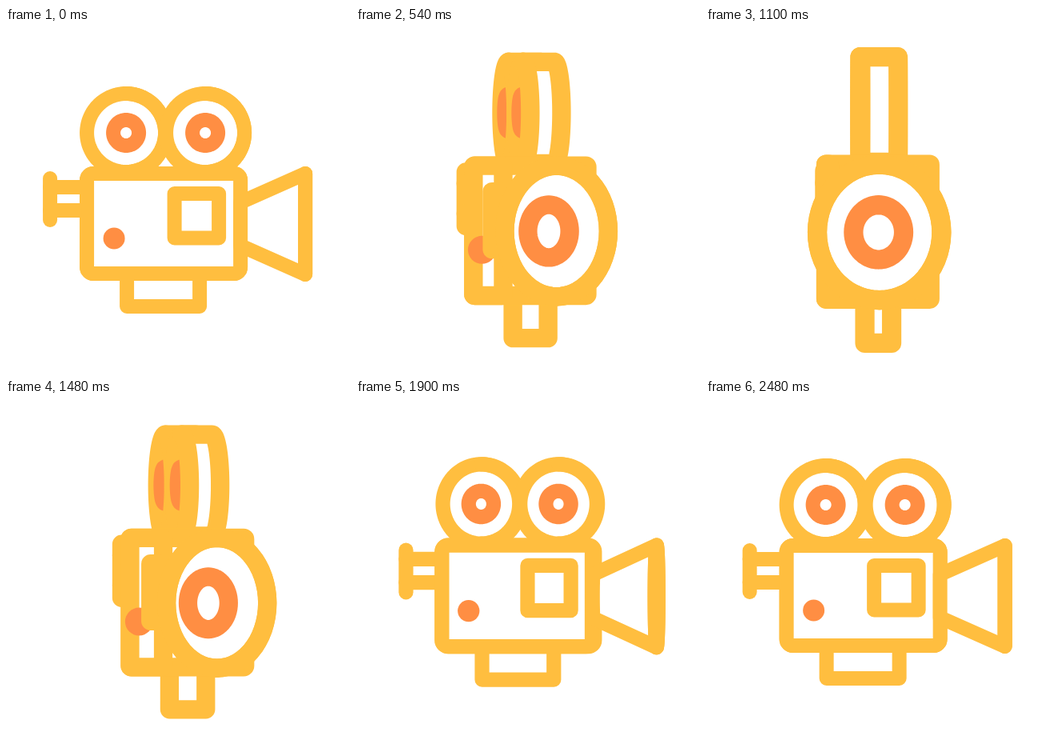
Animation of 430 by 430 pixels, one loop 2500 ms. Source, as an HTML page with a canvas:

```html
<!DOCTYPE html>
<html lang="en">
<head>
<meta charset="utf-8">
<title>Film camera</title>
<style>
  html, body { margin: 0; width: 100%; height: 100%; overflow: hidden; background: #fff; }
  canvas { display: block; }
</style>
</head>
<body>
<canvas id="stage" width="430" height="430"></canvas>
<script>
const ctx = document.getElementById('stage').getContext('2d');
const YELLOW = '#ffbe3f', ORANGE = '#ff8e43', WHITE = '#fff';
const LOOP = 2500, TURN = 1000, MID = 215, PI = Math.PI;

// Sideways sway: [time, offset]
const SWAY = [[0, 0], [120, 10], [260, 18.3], [400, 14.5], [540, 6.2], [680, 0.5], [800, -2],
  [900, -2.5], [1100, 0], [1300, 4.5], [1480, 15.5], [1620, 18.6], [1760, 14.5], [1900, 5.5],
  [2040, -2], [2170, -4.7], [2340, -3], [2500, 0]];

const lerp = (a, b, p) => a + (b - a) * p;

// Cubic Bézier easing with flat ends
function ease(x, x1 = 0.35, x2 = 0.12) {
  if (x <= 0) return 0;
  if (x >= 1) return 1;
  let lo = 0, hi = 1, s;
  for (let i = 0; i < 24; i++) {
    s = (lo + hi) / 2;
    const u = 1 - s;
    if (3 * s * u * u * x1 + 3 * s * s * u * x2 + s ** 3 < x) lo = s; else hi = s;
  }
  return s * s * (3 - 2 * s);
}

function swayAt(t) {
  let i = 0;
  while (i < SWAY.length - 2 && SWAY[i + 1][0] <= t) i++;
  const slope = j => {
    const a = SWAY[Math.max(j - 1, 0)], b = SWAY[Math.min(j + 1, SWAY.length - 1)];
    return (b[1] - a[1]) / (b[0] - a[0]);
  };
  const [t0, y0] = SWAY[i], [t1, y1] = SWAY[i + 1];
  const h = t1 - t0, u = (t - t0) / h, v = 1 - u;
  return v * v * ((1 + 2 * u) * y0 + u * h * slope(i)) + u * u * ((3 - 2 * u) * y1 - v * h * slope(i + 1));
}

function arc(cx, cy, rx, ry, from = 0, to = 2 * PI) {
  const points = [];
  for (let i = 0; i <= 60; i++) {
    const a = lerp(from, to, i / 60);
    points.push([cx + rx * Math.cos(a), cy + ry * Math.sin(a)]);
  }
  return points;
}

function shape(points, { stroke = YELLOW, fill, open } = {}) {
  ctx.beginPath();
  points.forEach(([x, y]) => ctx.lineTo(x, y));
  if (!open) ctx.closePath();
  if (fill) { ctx.fillStyle = fill; ctx.fill(); }
  if (stroke) { ctx.strokeStyle = stroke; ctx.stroke(); }
}

function box(left, top, right, bottom, radius, fill) {
  ctx.beginPath();
  ctx.roundRect(left, top, right - left, bottom - top, radius);
  if (fill) { ctx.fillStyle = fill; ctx.fill(); }
  ctx.strokeStyle = YELLOW;
  ctx.stroke();
}

// turn: 0 is the side view, 1 the front view
function drawCamera(turn) {
  const x = (side, front) => lerp(side, front, turn);
  const flat = 1 - turn;

  // Foot and viewfinder
  box(x(151, 203), 300, x(242, 227.6), 348, 0, WHITE);
  const eye = x(55, 166), left = x(101, 167);
  shape([[eye, 188], [eye, 240]], { open: true });
  for (const y of [199, 228]) shape([[eye, y], [left, y]], { open: true });

  // Reels
  for (const side of [150, 249]) {
    const cx = x(side, 198.5), r = 49 * flat;
    shape([...arc(cx, 131, r, 49, PI / 2, 3 * PI / 2),
           ...arc(cx + 35 * turn, 131, r, 49, -PI / 2, PI / 2)], { fill: WHITE });
    if (turn < 0.985) shape(arc(cx, 131, 16 * flat, 16), { stroke: ORANGE });
    shape(arc(cx, 131, r, 49, -PI / 2, PI / 2), { open: true });
  }

  // Body
  const round = 8 * flat, right = x(293, 169);
  box(left, 182, x(293, 263), 307, round, WHITE);
  box(left, 182, right, 307, round, WHITE);
  ctx.fillStyle = ORANGE;
  if (turn < 0.985) {
    ctx.beginPath();
    ctx.arc(x(135, 171), 263, 13.5, 0, 2 * PI);
    ctx.fill();
  }
  box(x(210.5, 170), 207, x(266, 170), 262.5, 0);

  // Lens hood
  const rim = x(374, 215.5), rimWidth = 58 * turn;
  const rimOval = arc(rim, 245, rimWidth, 63);
  shape([...arc(x(293, 215), 245, 25 * turn, 27, PI / 2, 3 * PI / 2), [rim, 182], [rim, 308]], { fill: WHITE });
  shape(rimOval, { fill: WHITE });
  ctx.save();
  shape(rimOval, { stroke: null });
  ctx.clip();
  shape(arc(x(324, 215), 245, 23.4 * turn, 25.4), { stroke: ORANGE });
  ctx.restore();
  shape(rimOval);
}

function frame(now) {
  const t = now % LOOP;
  const turn = ease(Math.min(t, 2 * TURN - t) / TURN);
  const zoom = 1 + 0.347 * turn;
  ctx.setTransform(1, 0, 0, 1, 0, 0);
  ctx.fillStyle = WHITE;
  ctx.fillRect(0, 0, 430, 430);
  ctx.translate(MID + swayAt(t), MID);
  ctx.scale(zoom, zoom);
  ctx.translate(-MID, -MID);
  ctx.lineWidth = 18;
  ctx.lineJoin = ctx.lineCap = 'round';
  drawCamera(turn);
  requestAnimationFrame(() => frame(performance.now()));
}
frame(performance.now());
</script>
</body>
</html>
```
